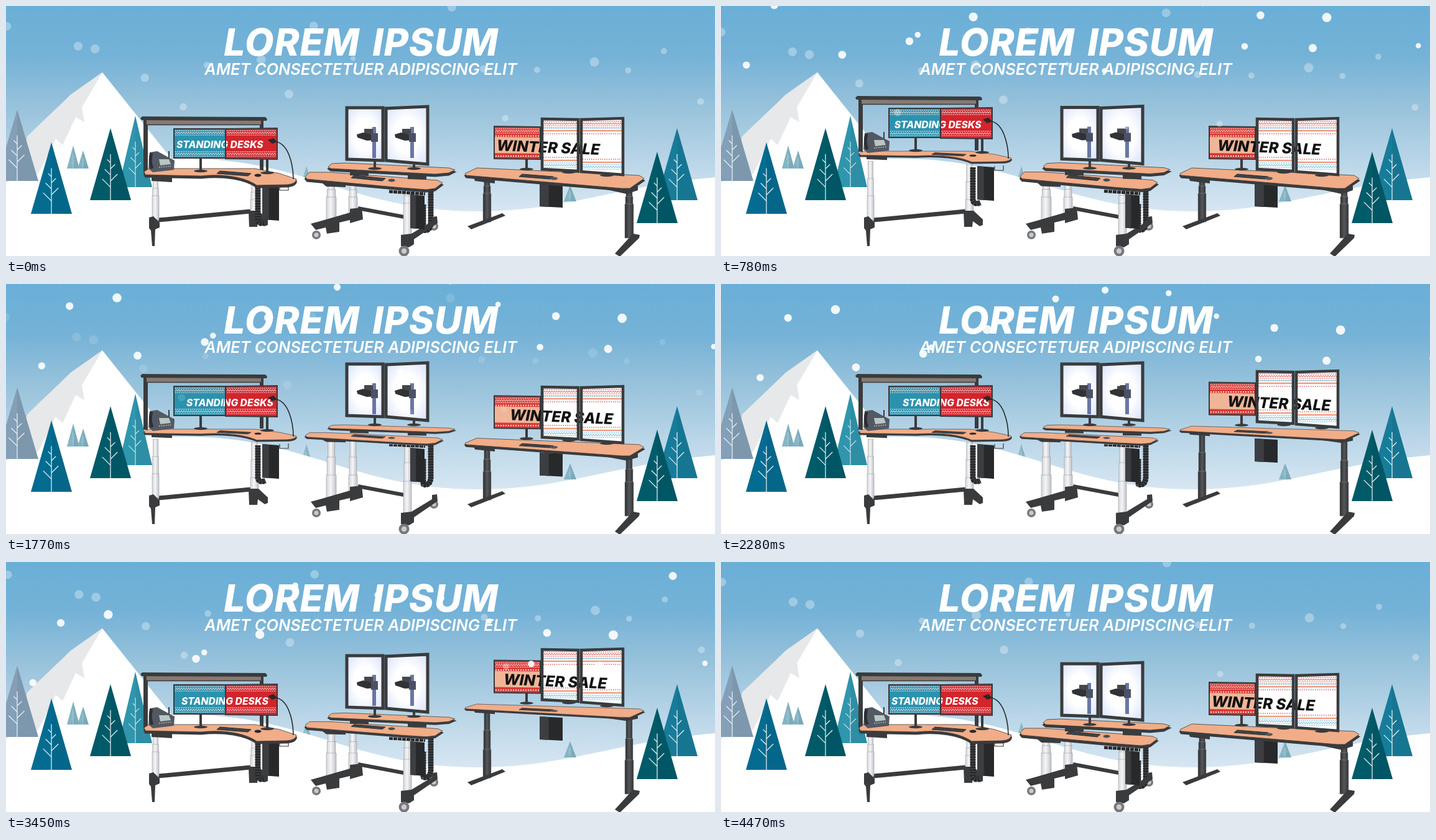
Recreate the animation shown at these times as an HTML page. Size 1140 px wide and 403 px high, loop 4500 ms.

```html
<!DOCTYPE html>
<html lang="en">
<head>
<meta charset="utf-8">
<title>Winter desks</title>
<style>
html, body { margin: 0; width: 100%; height: 100%; overflow: hidden; background: #fff; }
svg { display: block; width: 1140px; height: 403px; }
text { font-family: Inter, "Open Sans", sans-serif; font-style: italic; font-weight: 800; }
</style>
</head>
<body>
<svg viewBox="0 0 1140 403" xmlns="http://www.w3.org/2000/svg">
  <defs>
    <linearGradient id="sky" x2="0" y2="1">
      <stop offset="0" stop-color="#6aafd7"/><stop offset=".2" stop-color="#75b2d7"/>
      <stop offset=".4" stop-color="#97c2db"/><stop offset=".68" stop-color="#c3dbeb"/>
      <stop offset=".82" stop-color="#d7e6f2"/>
    </linearGradient>
    <radialGradient id="glow" r=".75">
      <stop offset=".4" stop-color="#fff"/><stop offset="1" stop-color="#d2ddfb"/>
    </radialGradient>
    <linearGradient id="metal">
      <stop offset="0" stop-color="#d3d4d8"/><stop offset=".45" stop-color="#f6f6f8"/><stop offset="1" stop-color="#bfc1c6"/>
    </linearGradient>
    <linearGradient id="steel">
      <stop offset="0" stop-color="#2c2d2f"/><stop offset=".5" stop-color="#55575a"/><stop offset="1" stop-color="#333436"/>
    </linearGradient>
  </defs>
  <rect width="1140" height="403" fill="url(#sky)"/>
  <path d="M155 107 285 270V285H20L36 212 104 143Z" fill="#fff"/>
  <path d="M155 107 122 163 126 187 112 179 91 224 80 214 52 270 20 285 34 210 104 143Z" fill="#e6e8e9"/>
  <g id="farTrees"></g>
  <path d="M0 283C100 270 170 246 290 246C480 246 560 331 760 331C900 331 980 290 1140 276V403H0Z" fill="#fff"/>
  <g id="trees"></g>
  <g id="desks"></g>
  <g fill="#fff" text-anchor="middle">
    <text x="571" y="80" font-size="60.5" letter-spacing="1" word-spacing="6">LOREM IPSUM</text>
    <text x="570.5" y="111" font-size="25.4" style="font-weight: 600">AMET CONSECTETUER ADIPISCING ELIT</text>
  </g>
  <g id="snow" fill="#fff"></g>
</svg>
<script>
const LOOP = 4500, TURN = 2190, SQUASH = .35;
const DARK = '#3a3b3d', BLACK = '#28292b', TAN = '#f1ad87', RED = '#d2252c', TEAL = '#2b92ae', PEACH = '#f0b597';
const $ = id => document.getElementById(id);
const desks = $('desks');
const movers = [];

function el(parent, tag, attrs) {
  const node = document.createElementNS('http://www.w3.org/2000/svg', tag);
  for (const key in attrs) node.setAttribute(key, attrs[key]);
  return parent.appendChild(node);
}
const shape = (g, d, fill, more) => el(g, 'path', { d, fill, ...more });
const line = (g, d, stroke, width, dash = 'none') =>
  shape(g, d, 'none', { stroke, 'stroke-width': width, 'stroke-dasharray': dash });
const box = (g, x, y, width, height, fill) => el(g, 'rect', { x, y, width, height, fill });
const oval = (g, cx, cy, rx, ry, fill) => el(g, 'ellipse', { cx, cy, rx, ry, fill });

// A group that lifts with its desk.
function riser(desk, lift) {
  const g = el(desks, 'g', {});
  movers.push({ desk, set: p => g.setAttribute('transform', `translate(0 ${-lift * p})`) });
  return g;
}
// A level surface: seen flatter the higher it stands.
function level(desk, back, lift) {
  const g = el(desks, 'g', {});
  movers.push({ desk, set: p => g.setAttribute('transform',
    `translate(0 ${back - lift * p}) scale(1 ${1 - SQUASH * p}) translate(0 ${-back})`) });
  return g;
}
function slab(g, d) {
  shape(g, d, DARK, { transform: 'translate(0 3.5)', stroke: DARK, 'stroke-width': 2 });
  shape(g, d, TAN, { stroke: DARK, 'stroke-width': .8 });
}
// A telescopic leg: three nested tubes, the upper ones slide.
function leg(desk, x, w, top, lift, bottom, fill) {
  for (let i = 0; i < 3; i++) {
    const width = w * (.72 + .14 * i), y = top + 12 * i;
    const tube = box(desks, x + (w - width) / 2, y, width, bottom - y, fill);
    tube.setAttribute('stroke', '#8d9096');
    tube.setAttribute('stroke-width', .5);
    movers.push({ desk, set(p) {
      const up = lift * p * (1 - i / 2);
      tube.setAttribute('y', y - up);
      tube.setAttribute('height', bottom - y + up);
    } });
  }
}
function tower(g, x, y, w, h) {
  shape(g, `M${x} ${y}l${w} 2v${h - 2}l${-w} -2Z`, BLACK);
  shape(g, `M${x} ${y}l${w * .4} 1v${h - 2}l${-w * .4} -1Z`, '#3d3e41');
}
function chain(g, d) {
  line(g, d, '#4a4b4e', 8);
  line(g, d, BLACK, 9, '3 1.2');
}
function keyboard(g, x, y, slope) {
  shape(g, `M${x} ${y}l5 -4 50 ${slope} -5 4Z`, '#3f4348', { stroke: '#2c2e31' });
}
function wheel(x, y, r) {
  oval(desks, x, y, r, r, '#77797d');
  oval(desks, x, y, r / 2, r / 2, '#c9cacd');
}
function stand(g, x, y1, y2) {
  line(g, `M${x} ${y1}V${y2}`, DARK, 4);
  oval(g, x, y2, 11, 2.2, DARK);
}
// A monitor outline; the top and bottom edges may slope.
const pane = (x, y, w, h, a = 0, b = a) => `M${x} ${y}l${w} ${a}V${y + h + b}L${x} ${y + h}Z`;
const bezel = (g, d, w) => line(g, d, DARK, w);
// Knitted trim: dotted rows around a zigzag.
function trim(g, x, y, w, color) {
  const n = Math.round(w / 4), step = w / n / 2;
  line(g, `M${x} ${y}h${w}`, color, 1.5, '1.5 1.5');
  line(g, `M${x} ${y + 5}` + `l${step} -3l${step} 3`.repeat(n), color, 1);
  line(g, `M${x} ${y + 7}h${w}`, color, 1.2, '2 1');
}

function tree(g, x, top, base, half, fill) {
  const h = base - top;
  shape(g, `M${x} ${top}L${x - half} ${base}H${x + half}Z`, fill);
  shape(g, `M${x} ${top}V${base}H${x + half}Z`, '#000', { opacity: .05 });
  let d = `M${x} ${base}V${top + h * .36}`;
  for (let i = 0; i < 5; i++) {
    const r = half * (.16 + .06 * i), side = i % 2 ? 1 : -1;
    d += `M${x} ${top + h * (.48 + .085 * i)}l${side * r} ${-r}`;
  }
  line(g, d, '#e3eef3', half / 26);
}
const far = $('farTrees'), near = $('trees');
tree(far, 483, 258, 295, 11, '#8fbccb');
tree(near, 18, 167, 282, 34, '#849fb6');
tree(near, 108, 225, 262, 10, '#83b5c4');
tree(near, 124, 233, 262, 9, '#7fb3c3');
tree(near, 208, 177, 292, 27, '#2f96ae');
tree(near, 168, 197, 313, 33, '#005b69');
tree(near, 73, 220, 335, 33, '#046c91');
tree(near, 907, 289, 315, 10, '#83b5c4');
tree(near, 1079, 197, 313, 33, '#177c9a');
tree(near, 1047, 235, 350, 33, '#005b69');

// Corner desk
const hutch = riser(0, 33);
box(hutch, 221, 184, 7, 84, DARK);
box(hutch, 408, 184, 6, 82, DARK);
box(hutch, 226, 184, 184, 7, '#867a72');
line(hutch, 'M226 191.5H410', DARK, 1.5);
shape(hutch, 'M219 178 417 179 420 182 419 185 218 184 216 181Z', DARK);

line(desks, 'M245 345 393 331', DARK, 7);
leg(0, 235, 11, 282, 32, 345, 'url(#metal)');
leg(0, 393, 13, 288, 33, 336, 'url(#metal)');
shape(desks, 'M230 341 237 339 247 349V357L240 360 239 387H235L233 362 230 358Z', DARK);
shape(desks, 'M390 330H406L421 344V353L416 355 405 347 404 356H391Z', DARK);
const rig = riser(0, 32);
chain(rig, 'M405 292V345Q407 353 417 349');
tower(rig, 412, 290, 27, 56);
line(rig, 'M440 290V297H454V289', DARK, 1.2);

const corner = level(0, 262, 28);
shape(corner, 'M234 274 267 276V284L234 282Z', DARK);
slab(corner, 'M222 267 230 262H400L440 270 467 279Q466 287 452 288L403 289C385 276 350 270 314 274L224 272Z');
keyboard(corner, 339, 270, 4);
oval(corner, 405, 273, 5.5, 2.6, BLACK);

const phone = riser(0, 31);
shape(phone, 'M231 236 243 234 271 249 270 264 236 268 229 262Z', '#535963');
shape(phone, 'M246 247H262L265 255 248 257Z', '#b9c7c4');
line(phone, 'M234 237Q230 250 235 262', '#2c2f35', 5);
line(phone, 'M246 260 267 258', '#9aa1a9', 2, '2 1.5');
line(phone, 'M262 245V234', DARK, 2);

const duo = riser(0, 33);
const wide = [pane(270, 198, 83, 47), pane(353, 198, 83, 48, -1, 1)];
stand(duo, 313, 246, 266);
stand(duo, 420, 246, 269);
wide.forEach((d, i) => {
  shape(duo, d, i ? RED : TEAL);
  for (const y of [201, 235]) trim(duo, 272 + 83 * i, y, 79, '#f5dfe0');
});
const deskText = el(duo, 'text', { 'font-size': 15.7, fill: '#fff' });
deskText.textContent = 'STANDING DESKS';
wide.forEach(d => bezel(duo, d, 2));
line(duo, 'M427 218Q446 217 455 240Q462 258 462 279', BLACK, 1.6);
shape(duo, 'M421 216 430 213 436 219 428 222Z', BLACK);

// Wheeled desk
line(desks, 'M566 326 640 340', DARK, 6);
wheel(567, 339, 6);
wheel(688, 355, 7);
leg(1, 551, 14, 284, 34, 334, 'url(#metal)');
leg(1, 515, 16, 284, 34, 350, 'url(#metal)');
shape(desks, 'M490 351 515 344 553 333V327L572 325 574 344 553 350V345L536 349V364L516 367 514 357 498 361Z', DARK);
const cart = riser(1, 38);
chain(cart, 'M683 294V350Q682 364 671 361V320');
leg(1, 639, 13, 294, 36, 374, 'url(#metal)');
shape(desks, 'M635 369 652 367 685 347V340L693 339 694 350 656 376V384L648 389 635 387Z', DARK);
wheel(499, 369, 7);
wheel(640, 395, 8.5);
tower(riser(1, 40), 650, 304, 23, 56);

const bench = level(1, 267, 28);
shape(bench, 'M502 280 546 283V292L515 291Z', DARK);
line(bench, 'M616 299 674 303', BLACK, 5, '6 1');
slab(bench, 'M481 275 488 268H520L694 281 702 285 690 294 676 296 636 293 484 279Z');
keyboard(bench, 555, 277, 5);
oval(bench, 620, 281, 5.5, 2.6, '#4b4f54');

const shelf = level(1, 253, 26);
for (const [x, y] of [[553, 264], [646, 270]]) shape(shelf, `M${x} ${y}l30 2v8l-30 -1Z`, DARK);
slab(shelf, 'M518 259 524 254 545 253 712 261 722 264 712 269 690 271 522 262Z');

const pair = riser(1, 35);
stand(pair, 593, 249, 262);
stand(pair, 656, 253, 262);
for (const d of [pane(548, 164, 58, 83, 0, 2), pane(611, 165, 67, 84, -3, 6)]) {
  shape(pair, d, 'url(#glow)');
  bezel(pair, d, 5);
}
for (const x of [0, 61]) {
  const arm = el(pair, 'g', { transform: `translate(${x} 0)` });
  box(arm, 589, 195, 6, 50, '#6877a3');
  box(arm, 576, 198, 14, 16, '#45474c');
  shape(arm, 'M564 207 574 204 596 209 597 216 580 217 565 212Z', '#303236');
  box(arm, 587, 205, 11, 14, '#4c5264');
}

// Long desk
tower(riser(2, 37), 858, 286, 37, 39);
leg(2, 767, 13, 278, 37, 348, 'url(#steel)');
leg(2, 995, 14, 295, 45, 374, 'url(#steel)');
shape(desks, 'M742 355 798 334 803 338 748 360Z', DARK);
shape(desks, 'M979 399 1008 367 1019 369 1018 374 987 404Z', DARK);
const long = level(2, 261, 32);
shape(long, 'M752 276 786 279V286L754 282Z', DARK);
shape(long, 'M966 296 1016 290V297L998 303Z', DARK);
slab(long, 'M738 270 757 261 1018 273 1026 278 1003 294H990L740 273Z');
keyboard(long, 825, 275, 4);
oval(long, 881, 278, 6, 2.6, '#55585c');

const small = riser(2, 35.5), peach = pane(785, 194, 74, 52, 1);
stand(small, 837, 246, 263);
shape(small, peach, PEACH);
shape(small, pane(785, 194, 74, 17, 1), '#d83a38');
shape(small, pane(785, 237, 74, 9, 1), '#d83a38');
trim(small, 787, 198, 71, '#f8dcd2');
for (const y of [209.5, 242]) line(small, `M787 ${y}h71`, '#f8dcd2', 2, '2 2');
bezel(small, peach, 2);

const tall = riser(2, 41);
const upright = [pane(862, 182, 58, 81, 1, 3), pane(925, 183, 67, 84, -2, 5)];
stand(tall, 905, 265, 268);
stand(tall, 966, 270, 273);
upright.forEach((d, i) => {
  const x = 864 + 63 * i, w = 55 + 8 * i, low = 244 + 3 * i;
  shape(tall, d, '#fff');
  trim(tall, x, 186, w, '#e05a55');
  line(tall, `M${x} 196.5h${w}`, '#6db7d6', 2, '2 1');
  trim(tall, x, low + 9, w, '#6db7d6');
  for (const y of [201, low + 5]) line(tall, `M${x} ${y}h${w}`, '#ef9c7e', 2.5);
  for (const y of [206, low]) line(tall, `M${x} ${y}h${w}`, '#e05a55', 1.4, '1.5 2');
});
const saleText = el(riser(2, 35.5), 'text', { 'font-size': 24.2, fill: '#111' });
saleText.textContent = 'WINTER SALE';
const frames = riser(2, 41);
upright.forEach(d => bezel(frames, d, 4.5));

// Snow: one flake per column, height and size drawn from a seed.
function flakes(count, top, depth, seed) {
  const g = el($('snow'), 'g', {});
  const random = () => (seed = seed * 16807 % 2147483647) / 2147483647;
  for (let i = 0; i < count; i++) {
    const r = 3 + 4.5 * Math.sqrt(random());
    oval(g, (i + random()) * 1140 / count, top + depth * random(), r, r);
  }
  return g;
}
const soft = flakes(19, 0, 210, 90210);
const bright = flakes(19, -112, 216, 48271);

const clamp = v => Math.max(0, Math.min(1, v));
const ease = v => { v = clamp(v); return v * v * (3 - 2 * v); };
const lift = (t, i) => ease((t - 730 * i) / 730) - ease((t - 2690 - 410 * i) / 600);
const move = (node, x, y, more = '') => node.setAttribute('transform', `translate(${x} ${y})${more}`);

function draw(t) {
  for (const m of movers) m.set(lift(t, m.desk));

  const swing = Math.max(0, TURN - Math.abs(t - TURN));
  move(deskText, 274 + 9 * (1 - Math.cos(2 * Math.PI * t / LOOP)), 229.5);
  move(saleText, 788.5 + .012 * swing, 233, ' rotate(2.4)');

  move(bright, .0168 * swing, .0372 * t);
  bright.setAttribute('opacity', .9 * clamp(swing / 700));
  const drift = t < LOOP / 2 ? t : t - LOOP;
  move(soft, -.0014 * drift, .0117 * drift);
  soft.setAttribute('opacity', .32 * clamp((LOOP / 2 - Math.abs(drift)) / 1100));
}
function tick() {
  draw(performance.now() % LOOP);
  requestAnimationFrame(tick);
}
tick();
</script>
</body>
</html>
```
